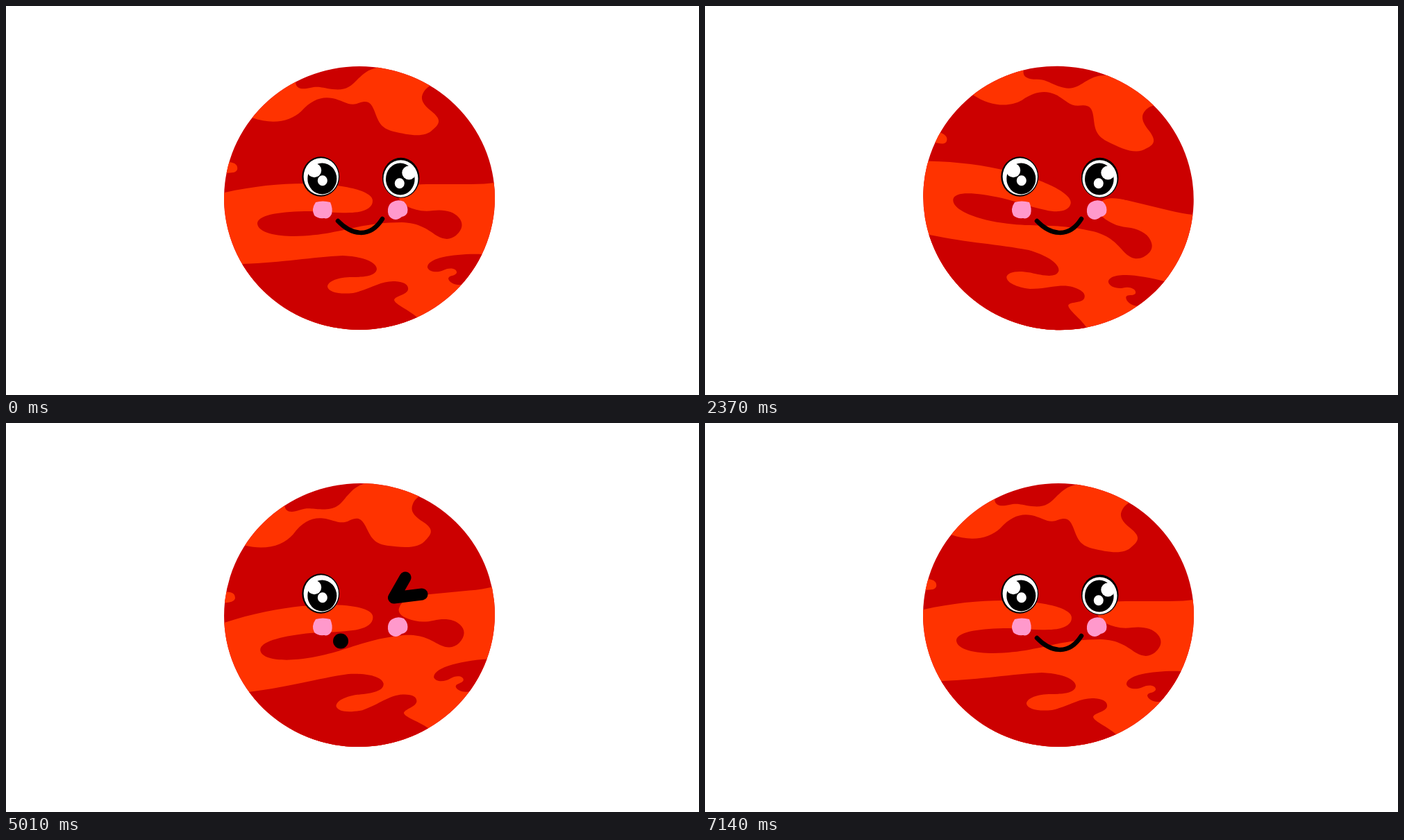
An HTML page for the animation above (7170 ms loop, 998 by 561 pixels).

```html
<!DOCTYPE html>
<html lang="en">
<head>
<meta charset="utf-8">
<title>Winking planet</title>
<style>
html, body { margin: 0; width: 100%; height: 100%; overflow: hidden; background: #fff; }
svg { display: block; width: 100vw; height: 100vh; }
.dark { fill: #c00; }
.light { fill: #f30; }
.pink { fill: #f9c; }
.white { fill: #fff; }
.line { fill: none; stroke: #000; stroke-linecap: round; stroke-linejoin: round; }
</style>
</head>
<body>
<svg viewBox="0 0 998 561">
  <clipPath id="disc"><ellipse cx="509" cy="277" rx="195" ry="190"/></clipPath>

  <g id="planet"><g clip-path="url(#disc)">
    <path class="dark" d="M300 70H720V480H300Z"/>
    <!-- northern clouds -->
    <path class="light" d="M354 161C385 172 410 166 425 152C440 135 455 130 470 133C485 136 492 144 505 141
      C520 135 525 138 530 150C536 165 538 176 558 181C580 186 603 191 615 178C627 168 625 162 613 152
      C600 142 596 134 601 125C604 119 608 117 612 114L640 90L580 60L534 80V89
      C520 92 515 98 507 105C495 118 488 122 470 120C455 118 450 115 438 118C425 121 417 119 417 109
      L400 90L330 150Z"/>
    <path class="light" d="M310 225H321C332 226 334 231 333 236C330 242 322 240 316 241H300Z"/>
    <!-- equatorial band -->
    <path class="light" d="M300 272L315 269C355 260 395 256 430 256L605 257H670Q690 257 703 255L720 252V480H300Z"/>
    <path class="dark" d="M425 250L430 256C490 257 528 267 528 281C528 293 512 298 495 298
      C470 299 455 296 430 296C390 297 362 302 362 314C363 327 390 332 415 332
      C480 331 505 312 570 312C595 313 605 321 620 331C632 338 640 337 648 331
      C658 322 659 313 652 305C645 296 630 293 615 295C600 297 588 294 578 289
      C568 284 564 278 567 272C572 261 585 257 605 257V250Z"/>
    <!-- southern clouds -->
    <path class="dark" d="M300 373L341 372C400 370 440 362 485 360C510 361 533 368 534 379
      C533 390 515 391 495 391C475 392 463 398 463 405C465 413 480 416 500 414
      C525 408 540 396 560 397C575 398 580 403 579 409C577 417 560 418 559 424
      C561 431 580 438 592 449L610 480H300Z"/>
    <path class="dark" d="M700 358H686C665 357 645 359 630 362C612 366 607 372 607 377
      C609 384 622 385 630 381C640 376 650 379 649 385C646 390 638 388 637 393
      C638 399 647 403 656 402L680 420Z"/>
  </g></g>

  <path class="pink" d="M446 283Q456 280 467 283Q471 292 469 300Q465 308 458 306Q449 307 444 302Q439 293 446 283Z"/>
  <path class="pink" d="M556 283Q564 278 573 282Q580 289 578 298Q576 303 570 304Q562 311 555 306Q549 302 550 293Q551 286 556 283Z"/>

  <g>
    <ellipse cx="453.3" cy="246" rx="27" ry="28.7"/>
    <ellipse class="white" cx="453.8" cy="246" rx="25.2" ry="26.8"/>
    <ellipse cx="455.3" cy="249" rx="21" ry="22.5"/>
    <circle class="white" cx="444" cy="237" r="10.2"/>
    <ellipse class="white" cx="455.8" cy="251.7" rx="7" ry="7.5"/>
  </g>

  <g id="smile">
    <ellipse cx="568.7" cy="247.7" rx="26.8" ry="29"/>
    <ellipse class="white" cx="568.5" cy="249" rx="25" ry="26.7"/>
    <ellipse cx="567.8" cy="249.5" rx="20.8" ry="23"/>
    <circle class="white" cx="580.3" cy="240.5" r="10"/>
    <ellipse class="white" cx="566.8" cy="255.7" rx="7" ry="7.5"/>
    <path class="line" stroke-width="6.5" d="M478 310C496 329 523 337 542 307"/>
  </g>

  <g id="wink">
    <path class="line" stroke-width="17" d="M575 223L558.5 252L599 247"/>
    <circle cx="482" cy="314.5" r="11"/>
  </g>
</svg>
<script>
const [planet, smile, wink] = ["planet", "smile", "wink"].map(id => document.getElementById(id));
const LOOP = 7170, STEP = 30, SWING = 3570, PEAK = 2640;
const MAX_TILT = 19.1, RANGE = 36.65;

function draw(now) {
  const t = Math.floor(now % LOOP / STEP) * STEP;
  // steady back-and-forth tilt, reversing at both ends
  const phase = (t - PEAK + SWING) % SWING;
  const fall = Math.min(phase, SWING - phase) / (SWING / 2);
  planet.setAttribute("transform", `rotate(${MAX_TILT - RANGE * fall} 509 277)`);

  const winking = t >= 4410 && t < 5610;
  smile.style.display = winking ? "none" : "";
  wink.style.display = winking ? "" : "none";
}

const start = performance.now();
function tick() {
  draw(performance.now() - start);
  requestAnimationFrame(tick);
}
tick();
</script>
</body>
</html>
```
